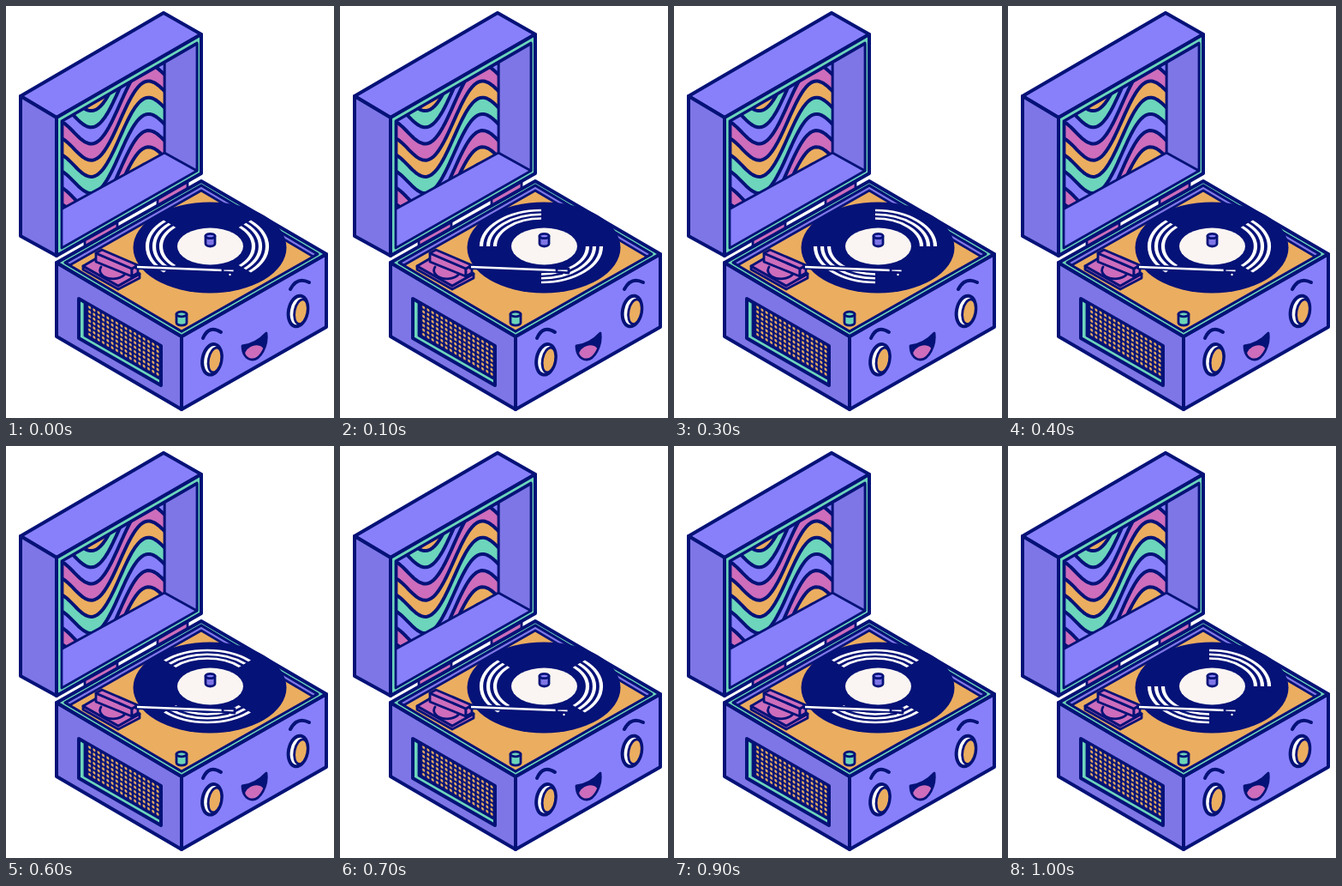
Write an HTML page that moves like this. It is 383x480 px and loops after 1100 ms.

```html
<!DOCTYPE html>
<html lang="en">
<head>
<meta charset="utf-8">
<title>Record player</title>
<style>
  html, body { margin: 0; width: 100%; height: 100%; overflow: hidden; background: #fff; }
  svg { display: block; width: 100vw; height: 100vh; }
  .ink { stroke: #051277; stroke-width: 4; stroke-linejoin: round; stroke-linecap: round; }
  .thin { stroke-width: 2.8; }
  .lit { fill: #8880fb; }
  .shade { fill: #7e76e6; }
  .teal { fill: #6cd5bb; }
  .pink { fill: #cd6dbb; }
  .gold { fill: #ebad60; }
  .navy { fill: #051277; }
  .cream { fill: #faf5f2; }
  .none { fill: none; }
</style>
</head>
<body>
<svg viewBox="0 0 383 480">
  <defs>
    <clipPath id="panel"><path d="M66 135 185 67V171L66 236Z"/></clipPath>
    <clipPath id="well"><path d="M69 299 228 209 364 289 205 379Z"/></clipPath>
    <clipPath id="smile"><path id="lips" d="M276 396Q292 394 304 381C306 396 297 412 288 412C279 412 276 403 276 396Z"/></clipPath>
    <pattern id="mesh" width="5.3" height="5.3" patternUnits="userSpaceOnUse" patternTransform="translate(95 347) skewY(30)">
      <circle class="gold" cx="2.6" cy="2.6" r="1.65"/>
    </pattern>
    <g id="eye">
      <ellipse class="ink" rx="11" ry="18" fill="#fff"/>
      <ellipse class="gold ink thin" cx="3.5" cy="0" rx="7.500" ry="14.500"/>
    </g>
  </defs>

  <!-- Lid -->
  <g class="ink">
    <path class="lit" d="M17 105 184 8 228 33 59 130Z"/>
    <path class="shade" d="M17 105 59 130V291L17 268Z"/>
    <path class="teal" d="M59 130 228 33V195L59 291Z"/>
    <path class="lit thin" d="M65 134 223 43V192L65 282Z"/>
    <path class="shade thin" d="M185 66 223 44V192L185 171Z"/>
  </g>
  <g id="waves" class="ink" clip-path="url(#panel)"></g>
  <path class="none ink thin" d="M66 134 185 66V171L66 236Z"/>

  <!-- Hinges -->
  <path class="pink ink thin" d="M92 273 130 252V259L92 280ZM177 225 212 205V213L177 233Z"/>

  <!-- Base -->
  <g class="ink">
    <path class="shade" d="M59 299 205 385V470L59 385Z"/>
    <path class="lit" d="M205 385 374 289V374L205 470Z"/>
    <path class="teal" d="M59 299 228 204 374 289 205 385Z"/>
    <path class="shade thin" d="M69 299 228 209 364 289 205 379Z"/>
    <path class="gold thin" clip-path="url(#well)" d="M69 305 228 215 364 295 205 385Z"/>
    <path class="none thin" d="M69 299 228 209 364 289 205 379Z"/>
  </g>

  <!-- Speaker -->
  <path class="teal ink" d="M85 341 181 396V442L85 387Z"/>
  <path class="navy ink thin" d="M92 346 181 397V435L92 384Z"/>
  <path fill="url(#mesh)" d="M95 348 180 397V433L95 383Z"/>

  <!-- Record -->
  <ellipse class="navy" cx="238" cy="281.500" rx="89.500" ry="53"/>
  <g id="grooves" class="none" stroke="#fff" stroke-width="4.2">
    <circle r="70" pathLength="4" stroke-dasharray="1"/>
    <circle r="62" pathLength="4" stroke-dasharray="1"/>
    <circle r="54" pathLength="4" stroke-dasharray="1"/>
  </g>
  <ellipse class="cream" cx="238.500" cy="280" rx="38.500" ry="21.500"/>
  <path class="shade ink thin" d="M233 268V277A5.500 3 0 0 0 244 277V268"/>
  <ellipse class="lit ink thin" cx="238.500" cy="268" rx="5.500" ry="2.700"/>

  <!-- Tonearm -->
  <g class="pink ink thin">
    <path d="M90 303V307L131 330 156 317V312L131 326Z"/>
    <path d="M90 303 114 289 156 312 131 326Z"/>
    <path d="M111 304A14 9 0 0 0 139 312"/>
    <path d="M105 288 147 306V315L105 298Z"/>
    <path d="M147 306 154 302V311L147 315Z"/>
    <path d="M105 288 112 284 154 302 147 306Z"/>
  </g>
  <path class="none ink" d="M153 304 254 308" style="stroke-width:6"/>
  <path class="none" d="M153 304 254 308" stroke="#fff" stroke-width="2.300"/>
  <path class="ink thin" fill="#fff" d="M253 306 267 306V311L253 310Z"/>
  <circle cx="261.500" cy="313" r="1.200" fill="#fff"/>

  <!-- Knob -->
  <path class="teal ink thin" d="M199 359V369A6 3.200 0 0 0 211 369V359"/>
  <ellipse class="teal ink thin" cx="205" cy="359" rx="6" ry="2.900"/>

  <!-- Face -->
  <use href="#eye" transform="translate(240.500 411.800) rotate(11)"/>
  <use href="#eye" transform="translate(341 355.500) rotate(11)"/>
  <path class="none ink" d="M230 387Q237 371 251 380M332 330Q340 315 354 322"/>
  <g clip-path="url(#smile)">
    <path class="navy" d="M270 375H310V415H270Z"/>
    <ellipse class="pink" cx="290" cy="405" rx="12" ry="9" transform="rotate(-28 290 405)"/>
  </g>
  <use href="#lips" class="none ink thin"/>
</svg>
<script>
const waves = document.getElementById('waves');
const grooves = document.getElementById('grooves');
const colours = ['gold', 'teal', 'lit', 'pink'];

// Each band covers everything below its own upper edge.
const edge = (x, top) =>
  top - 30 - 0.6 * (x - 106) + 28 * Math.cos((x - 106) * Math.PI / 54);

for (let band = -2; band < 12; band++) {
  let d = 'M60 300';
  for (let x = 60; x <= 190; x += 2) d += `L${x} ${edge(x, 103 + 19.2 * band)}`;
  const path = document.createElementNS('http://www.w3.org/2000/svg', 'path');
  path.setAttribute('d', d + 'V300Z');
  path.setAttribute('class', colours[(band + 4) % 4]);
  waves.append(path);
}

// Eighth turns, with the spin restarting after the seventh step.
function draw(now) {
  const step = Math.floor(now / 100) % 11;
  const turn = (step < 7 ? step : step - 7) % 4;
  grooves.setAttribute('transform',
    `translate(235 280) scale(1 .6) rotate(${turn * 45 - 45})`);
  requestAnimationFrame(draw);
}
draw(performance.now());
</script>
</body>
</html>
```
